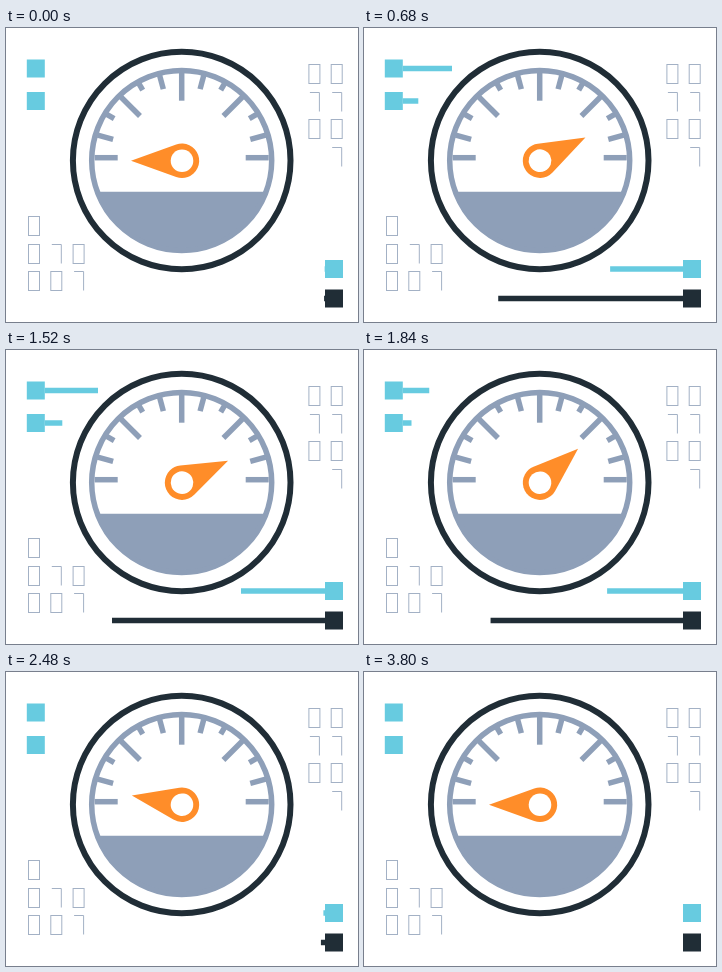
An HTML page with a canvas that plays this animation: 352x294 px, repeating every 3840 ms.

```html
<!DOCTYPE html>
<html lang="en">
<head>
<meta charset="utf-8">
<title>Speed gauge</title>
<style>
  html, body { margin: 0; width: 100%; height: 100%; overflow: hidden; background: #fff; }
  canvas { display: block; width: 352px; height: 294px; }
</style>
</head>
<body>
<canvas id="stage"></canvas>
<script>
const LOOP = 3840;
const INK = '#202d36', SLATE = '#8e9fb8', CYAN = '#67cbe0', ORANGE = '#ff8d29', THIN = '#a3b1c5';
const canvas = document.getElementById('stage');
const ctx = canvas.getContext('2d');
const ratio = window.devicePixelRatio || 1;
canvas.width = 352 * ratio;
canvas.height = 294 * ratio;

const progress = (t, start, end) => Math.min(1, Math.max(0, (t - start) / (end - start)));
const smooth = p => p * p * (3 - 2 * p);
const cubic = p => p < 0.5 ? 4 * p ** 3 : 1 - 4 * (1 - p) ** 3;

function line(x1, y1, x2, y2, color, width) {
  ctx.strokeStyle = color;
  ctx.lineWidth = width;
  ctx.beginPath();
  ctx.moveTo(x1, y1);
  ctx.lineTo(x2, y2);
  ctx.stroke();
}

function ring(x, y, radius, color, width) {
  ctx.strokeStyle = color;
  ctx.lineWidth = width;
  ctx.beginPath();
  ctx.arc(x, y, radius, 0, 2 * Math.PI);
  ctx.stroke();
}

// Each row is a string of digits; a space leaves the column empty.
function digits(x, y, rows) {
  ctx.strokeStyle = THIN;
  ctx.lineWidth = 1;
  rows.forEach((row, r) => [...row].forEach((digit, c) => {
    const left = x + c * 22.3, top = y + Math.round(r * 27.6);
    if (digit === '0') ctx.strokeRect(left, top, 11, 19);
    if (digit === '1') {
      ctx.beginPath();
      ctx.moveTo(left + 1, top);
      ctx.lineTo(left + 10.5, top);
      ctx.lineTo(left + 10.5, top + 19);
      ctx.stroke();
    }
  }));
}

function slider(x, y, length, color) {
  ctx.fillStyle = color;
  ctx.fillRect(x, y - 9, 18, 18);
  const start = length < 0 ? x : x + 18;
  if (Math.abs(length) > 0.1) line(start, y, start + length, y, color, 5.5);
}

function gauge() {
  const cx = 175.7, cy = 132.5;
  ring(cx, cy, 108.8, INK, 6);

  ctx.fillStyle = SLATE;
  const chord = Math.asin(31.3 / 91);
  ctx.beginPath();
  ctx.arc(cx, cy, 91, chord, Math.PI - chord);
  ctx.fill();
  ring(cx, cy, 90, SLATE, 5.5);

  const innerRadius = [64, 71, 78, 59, 78, 71, 57];
  for (let i = 0; i <= 12; i++) {
    const angle = i * Math.PI / 12;
    const inner = innerRadius[Math.min(i, 12 - i)];
    const dx = -Math.cos(angle), dy = -Math.sin(angle);
    line(cx + dx * inner, 129.7 + dy * inner, cx + dx * 87, 129.7 + dy * 87, SLATE, 5.5);
  }
}

function needle(degrees) {
  const radius = 17.2, reach = 51;
  const tangent = Math.acos(radius / reach);
  ctx.save();
  ctx.translate(176, 132.7);
  ctx.rotate(degrees * Math.PI / 180);
  ctx.fillStyle = ORANGE;
  ctx.beginPath();
  ctx.moveTo(-reach, 0);
  ctx.arc(0, 0, radius, Math.PI + tangent, Math.PI - tangent);
  ctx.closePath();
  ctx.fill();
  ctx.fillStyle = '#fff';
  ctx.beginPath();
  ctx.arc(0, 0, 11.3, 0, 2 * Math.PI);
  ctx.fill();
  ctx.restore();
}

function draw(t) {
  ctx.setTransform(ratio, 0, 0, ratio, 0, 0);
  ctx.fillStyle = '#fff';
  ctx.fillRect(0, 0, 352, 294);

  const rise = smooth(progress(t, 0, 400));
  const drift = smooth(progress(t, 1080, 1520));
  const leftBars = rise * (1 - smooth(progress(t, 1560, 2120)));
  // The right bars grow and shrink symmetrically around 1280 ms.
  const rightBars = t > 0 && t < 2600 ? cubic(progress(Math.min(t, 2560 - t), -120, 1060)) : 0;

  digits(302.9, 36.5, ['00', '11', '00', ' 1']);
  digits(22.5, 188.5, ['0', '010', '001']);
  slider(20.8, 40.5, (49.2 + 4 * drift) * leftBars, CYAN);
  slider(20.8, 73, (15.5 + 2 * drift) * leftBars, CYAN);
  gauge();
  slider(319, 241, -84 * rightBars, CYAN);
  slider(319, 270.5, -213 * rightBars, INK);
  needle((153 * rise + 1.5 * drift) * (1 - smooth(progress(t, 1640, 2640))));
}

function frame(now) {
  draw(now % LOOP);
  requestAnimationFrame(frame);
}
draw(0);
requestAnimationFrame(frame);
</script>
</body>
</html>
```
